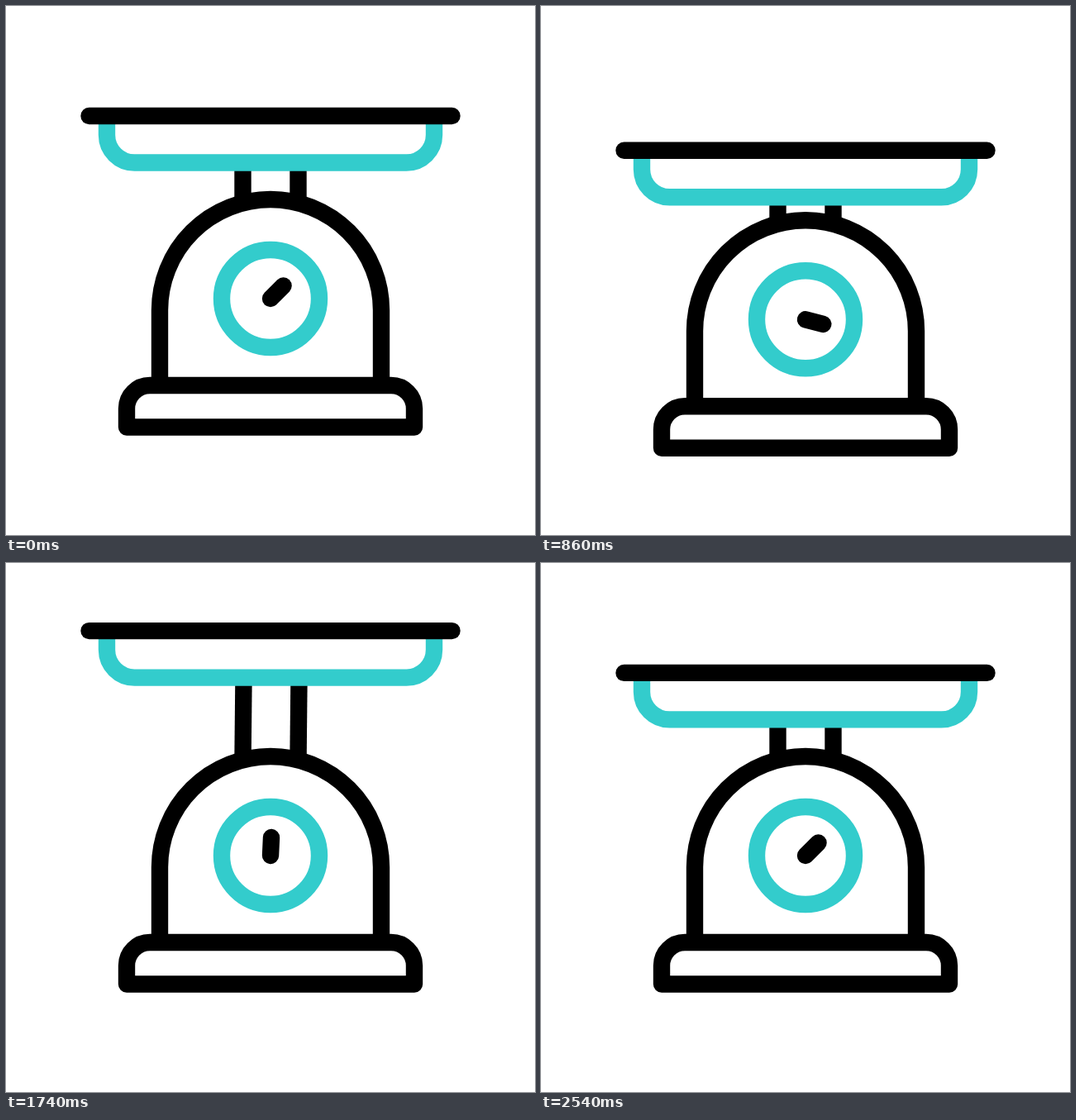
These frames come from a looping animation (640x640 px, 2.56 s). An HTML page with a canvas:

```html
<!DOCTYPE html>
<html lang="en">
<head>
<meta charset="utf-8">
<title>Kitchen scale</title>
<style>
  html, body { margin: 0; width: 100%; height: 100%; overflow: hidden; background: #fff; }
  canvas { display: block; width: 640px; height: 640px; }
</style>
</head>
<body>
<canvas id="stage" width="640" height="640"></canvas>
<script>
const ctx = document.getElementById('stage').getContext('2d');
const LOOP = 2560;
const STEP = 20;
const BLACK = '#000';
const TEAL = '#33cccc';

// Keyframes: [time in ms, value]
const BODY_DROP = [[0, 0], [1040, 30.6], [1440, 0], [LOOP, 0]];
const PLATE_SHIFT = [[0, 0], [1040, 17.9], [1280, -84], [1480, -51], [1720, -51], [LOOP, 0]];
const NEEDLE_ANGLE = [[0, 45], [1040, 110], [1280, -27], [1480, 2.6], [1720, 2.6], [LOOP, 45]];

const linear = p => p;
const smooth = p => p * p * (3 - 2 * p);

function valueAt(keys, t, ease) {
  const i = keys.findIndex(key => key[0] > t);
  const [t0, v0] = keys[i - 1];
  const [t1, v1] = keys[i];
  return v0 + (v1 - v0) * ease((t - t0) / (t1 - t0));
}

function stroke(color, cap, trace) {
  ctx.strokeStyle = color;
  ctx.lineCap = cap;
  ctx.beginPath();
  trace();
  ctx.stroke();
}

function line(x1, y1, x2, y2, cap) {
  stroke(BLACK, cap, () => {
    ctx.moveTo(x1, y1);
    ctx.lineTo(x2, y2);
  });
}

function drawPoles(plateY, bodyY, lean) {
  for (const x of [286.5, 353.5]) {
    line(x + lean, plateY + 56, x, bodyY + 238.5, 'butt');
  }
}

function drawPlate(y) {
  stroke(TEAL, 'butt', () => {
    ctx.moveTo(122, y);
    ctx.arcTo(122, y + 56.5, 320, y + 56.5, 33.5);
    ctx.arcTo(518, y + 56.5, 518, y, 33.5);
    ctx.lineTo(518, y);
  });
  line(100.5, y, 539.5, y, 'round');
}

function drawBody(angle) {
  stroke(BLACK, 'butt', () => {
    ctx.moveTo(186, 459);
    ctx.arc(320, 368, 134, Math.PI, 0);
    ctx.lineTo(454, 459);
  });
  stroke(BLACK, 'butt', () => {
    ctx.moveTo(146, 509.5);
    ctx.arcTo(146, 459, 320, 459, 28);
    ctx.arcTo(494, 459, 494, 509.5, 28);
    ctx.lineTo(494, 509.5);
    ctx.closePath();
  });
  stroke(TEAL, 'butt', () => ctx.arc(320, 354, 59, 0, Math.PI * 2));
  const a = angle * Math.PI / 180;
  line(320, 354, 320 + 22 * Math.sin(a), 354 - 22 * Math.cos(a), 'round');
}

function draw(t) {
  const bodyY = valueAt(BODY_DROP, t, linear);
  const shift = valueAt(PLATE_SHIFT, t, smooth);
  const plateY = 133 + bodyY + shift;

  ctx.fillStyle = '#fff';
  ctx.fillRect(0, 0, 640, 640);
  ctx.lineWidth = 20.4;
  ctx.lineJoin = 'round';

  drawPoles(plateY, bodyY, Math.max(0, -shift * 0.02));
  drawPlate(plateY);
  ctx.save();
  ctx.translate(0, bodyY);
  drawBody(valueAt(NEEDLE_ANGLE, t, smooth));
  ctx.restore();
}

const start = performance.now();

function tick() {
  const t = Math.max(0, performance.now() - start) % LOOP;
  draw(Math.floor(t / STEP) * STEP);
  requestAnimationFrame(tick);
}

tick();
</script>
</body>
</html>
```
